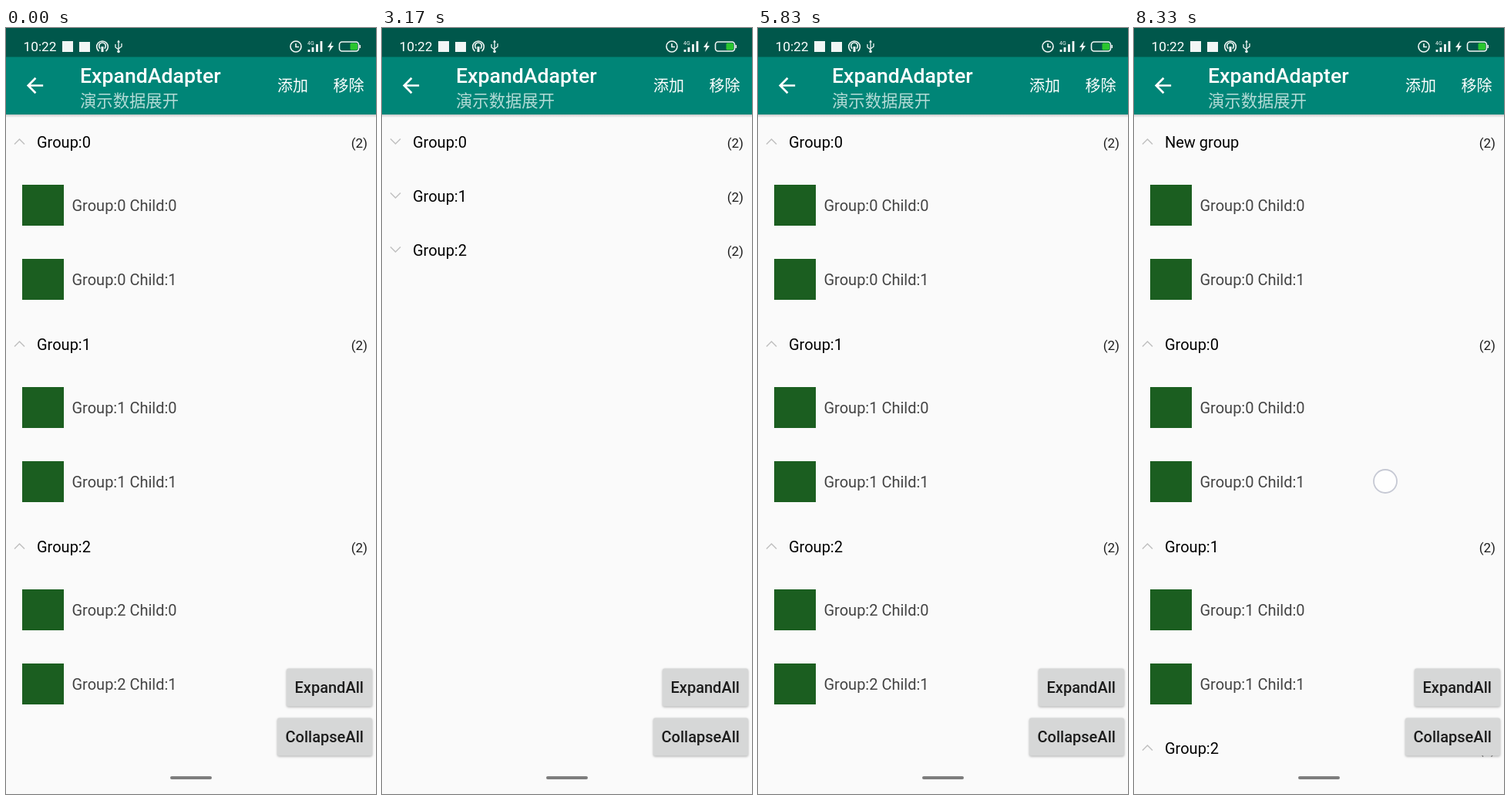
Animation of 480x992 px, one loop 8.49 s. Source, as an HTML page:

```html
<!DOCTYPE html>
<html lang="zh">
<head>
<meta charset="utf-8">
<title>ExpandAdapter</title>
<style>
html, body { margin: 0; width: 100%; height: 100%; overflow: hidden; background: #fafafa; }
svg { display: block; }
text { font-family: Roboto, "Noto Sans CJK SC", "Noto Sans CJK", sans-serif; font-size: 20px; }
.medium { font-weight: 500; }
.light { fill: #fff; }
.line { fill: none; stroke: #f2f6f5; stroke-width: 1.6; }
.icon { fill: #f2f6f5; }
.child { fill: #444; }
.count { font-size: 17px; text-anchor: end; fill: #1c1c1c; }
.chevron { fill: none; stroke: #c0c0c0; stroke-width: 1.5; }
.button rect { fill: #d6d7d7; filter: drop-shadow(0 1px 1.5px rgba(0, 0, 0, .3)); }
.button text { fill: #1c1c1c; }
.button.pressed rect { fill: #b5b6b7; filter: drop-shadow(0 3px 3px rgba(0, 0, 0, .4)); }
</style>
</head>
<body>
<svg width="480" height="992" viewBox="0 0 480 992">
  <defs>
    <clipPath id="view"><rect y="112" width="480" height="837"/></clipPath>
    <linearGradient id="shade" x2="0" y2="1">
      <stop stop-opacity=".2"/>
      <stop offset="1" stop-opacity="0"/>
    </linearGradient>
  </defs>
  <rect width="480" height="992" fill="#fafafa"/>
  <g id="list" clip-path="url(#view)"></g>

  <rect y="112" width="480" height="4" fill="url(#shade)"/>
  <rect width="480" height="38" fill="#00574b"/>
  <rect y="37.5" width="480" height="74.5" fill="#008577"/>

  <text class="light" x="22.5" y="30" style="font-size:17.3px">10:22</text>
  <rect class="icon" x="73" y="17" width="14" height="14"/>
  <rect class="icon" x="95" y="18" width="14" height="13"/>
  <g class="line">
    <path d="M120.5 30a7.3 7.3 0 1 1 9 0M122.3 26.6a4.3 4.3 0 1 1 5.4 0"/>
    <path d="M125 24v7" stroke-width="3"/>
    <path d="M146 17v13M142 21v4l4 3M150 20v4l-4 3" stroke-width="1.3"/>
    <circle cx="376" cy="24" r="7"/>
    <path d="M376 20v4.5h4"/>
    <path d="M393 31v-3M398 31v-6M403.5 31v-10M409 31v-14" stroke-width="2.8"/>
    <rect x="432.5" y="18" width="25" height="12" rx="3.5"/>
  </g>
  <g class="icon">
    <circle cx="146" cy="30.5" r="1.8"/>
    <path d="M146 15.5l2 3h-4zM423 17l-6 8h3.5l-1.5 6 6-8h-3.5z"/>
    <rect x="458.5" y="22" width="1.5" height="4"/>
    <text x="391" y="22" style="font-size:7px">4G</text>
  </g>
  <rect x="446.5" y="19.5" width="9.5" height="9" rx="1.5" fill="#2ac52f"/>

  <path class="light" transform="translate(21.5 58.5) scale(1.3333)" d="M20 11H7.83l5.59-5.59L12 4l-8 8 8 8 1.41-1.41L7.83 13H20z"/>
  <text class="light medium" x="96" y="71" style="font-size:26.67px">ExpandAdapter</text>
  <text class="light" x="96" y="101.5" fill-opacity=".7" style="font-size:21.33px">演示数据展开</text>
  <text class="light medium" x="352" y="82">添加</text>
  <text class="light medium" x="424.5" y="82">移除</text>

  <g class="button" id="expand">
    <rect x="364" y="829.5" width="111" height="49" rx="2.5"/>
    <text class="medium" x="374.5" y="861">ExpandAll</text>
  </g>
  <g class="button" id="collapse">
    <rect x="352" y="893.5" width="123" height="49" rx="2.5"/>
    <text class="medium" x="362.5" y="925">CollapseAll</text>
  </g>
  <rect x="213" y="969" width="54" height="4" rx="2" fill="#7d7d7d"/>
  <circle id="dot" r="15" fill="#fff" fill-opacity=".8" stroke="#c6c9d4" stroke-width="1.8"/>
</svg>
<script>
const LOOP = 8490, HEAD = 69.8, CHILD = 96, FULL = HEAD + 2 * CHILD;
const FADE = 120, MOVE = 250;
const $ = id => document.getElementById(id);
const clamp = v => Math.min(1, Math.max(0, v));
const ease = v => (1 - Math.cos(Math.PI * clamp(v))) / 2;

// Single groups collapse with an animation, the buttons switch all at once.
// Index 0 is the added group.
const all = [1, 2, 3];
const toggles = [
  { at: 730, who: [1] },
  { at: 1510, who: [2] },
  { at: 2340, who: [3] },
  { at: 4280, who: all, open: true },
  { at: 4950, who: all, instant: true },
  { at: 5500, who: all, open: true }
];

const touches = [
  { from: 600, to: 730, x: 150, y: 150 },
  { from: 1390, to: 1510, x: 150, y: 218 },
  { from: 2220, to: 2340, x: 150, y: 288 },
  { from: 4180, to: 4300, x: 417, y: 851, button: 'expand' },
  { from: 4830, to: 4950, x: 417, y: 916, button: 'collapse' },
  { from: 5380, to: 5500, x: 417, y: 851, button: 'expand' },
  { from: 6310, to: 6430, x: 372, y: 76 },
  { from: 6950, to: 7690, x: 106, y: 200.5, drag: true },
  { from: 8240, to: 8490, x: 326, y: 587 }
];

const groups = ['New group', 'Group:0', 'Group:1', 'Group:2'].map((name, i) => {
  const g = document.createElementNS('http://www.w3.org/2000/svg', 'g');
  const child = n => `<rect x="21" y="${91 + n * CHILD}" width="54" height="53" fill="#1b5e20"/>
    <text class="child" x="85.5" y="${125 + n * CHILD}">Group:${Math.max(0, i - 1)} Child:${n}</text>`;
  g.innerHTML = `<path class="chevron" d="M11 38.5l6.5-6.5 6.5 6.5"/>
    <text x="40" y="43">${name}</text><text class="count" x="469" y="43">(2)</text>
    <g>${child(0)}${child(1)}</g>`;
  $('list').append(g);
  return { g, chevron: g.firstChild, kids: g.lastChild };
});

function groupState(i, t) {
  const last = toggles.filter(({ at, who }) => at <= t && who.includes(i)).pop();
  if (!last || last.open) return { open: true, size: 1, alpha: 1 };
  if (last.instant) return { open: false, size: 0, alpha: 0 };
  const dt = t - last.at;
  return { open: false, size: 1 - ease((dt - FADE) / MOVE), alpha: 1 - clamp(dt / FADE) };
}

function scrollAt(t) {
  const a = clamp((t - 7000) / 333.3), b = clamp((t - 7333.3) / 333.3);
  return 105.5 * a + (FULL - 105.5) * b;
}

function drawTouch(t) {
  const hit = touches.find(({ from, to }) => t >= from && t < to + 100);
  const dot = $('dot');
  for (const id of ['expand', 'collapse'])
    $(id).classList.toggle('pressed', !!hit && hit.button === id);
  dot.style.display = hit ? '' : 'none';
  if (!hit) return;
  dot.setAttribute('cx', hit.x);
  dot.setAttribute('cy', hit.y + (hit.drag ? scrollAt(t) : 0));
  dot.style.opacity = (hit.button ? .6 : 1) * (1 - clamp((t - hit.to) / 100));
}

function render(t) {
  let y = 112 - FULL + scrollAt(t);
  groups.forEach(({ g, chevron, kids }, i) => {
    const { open, size, alpha } = groupState(i, t);
    g.setAttribute('transform', `translate(0 ${Math.round(y)})`);
    chevron.setAttribute('transform', open ? '' : 'translate(0 70) scale(1 -1)');
    kids.style.opacity = alpha;
    y += HEAD + 2 * CHILD * size;
  });
  drawTouch(t);
}

function tick() {
  const t = performance.now() % LOOP;
  render(Math.min(50, Math.floor(t * .006 + .02)) * 1000 / 6);
  requestAnimationFrame(tick);
}
tick();
</script>
</body>
</html>
```
